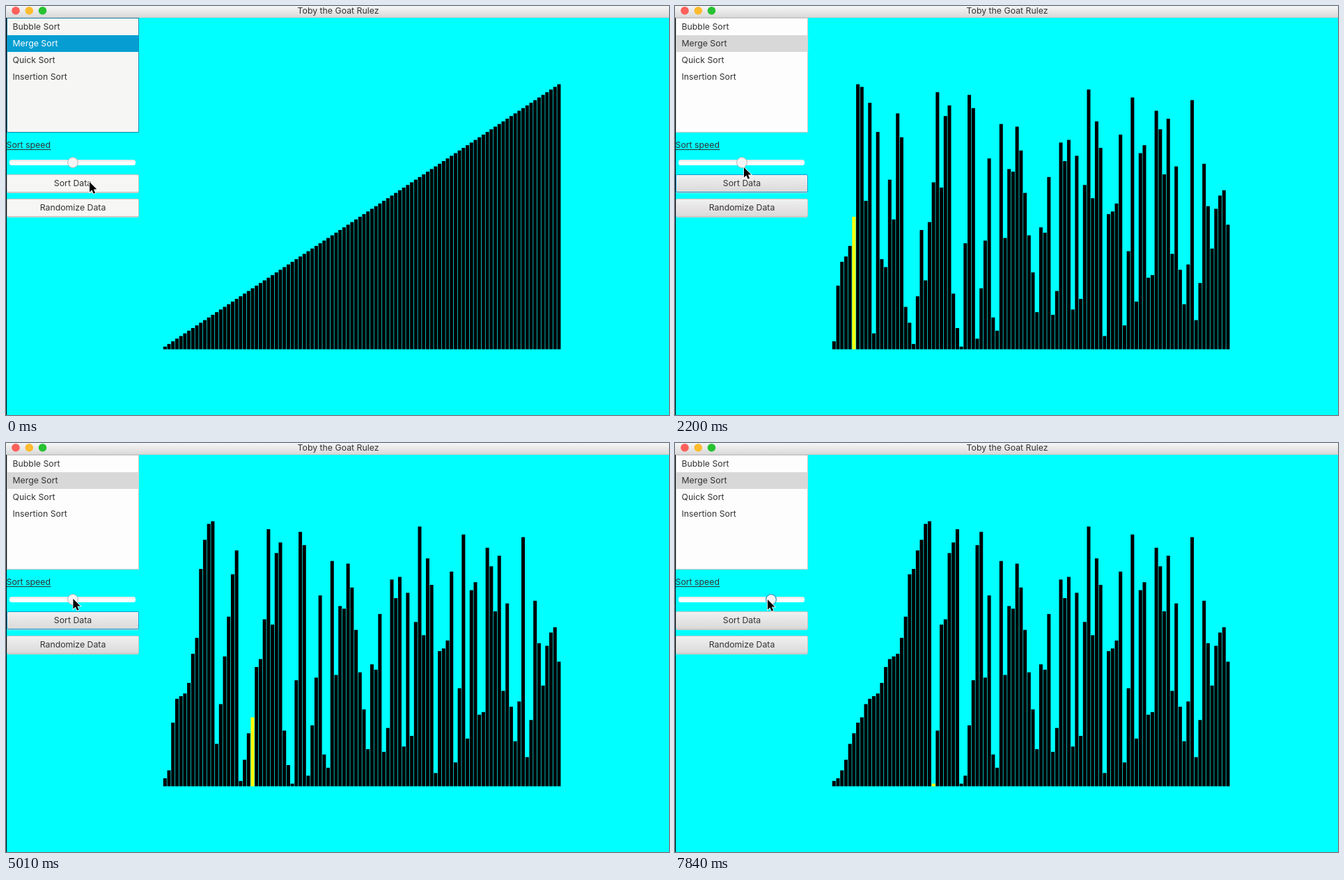
Write an HTML page that moves like this. It is 952 by 588 pixels and loops after 7.99 s.

```html
<!DOCTYPE html>
<html lang="en">
<head>
<meta charset="utf-8">
<title>Sort visualizer</title>
<style>
html, body { margin: 0; width: 100%; height: 100%; overflow: hidden; background: #0ff; }
svg { display: block; width: 952px; height: 588px; }
text { font: 12.3px Inter, Roboto, sans-serif; fill: #333; }
.mid { text-anchor: middle; }
</style>
</head>
<body>
<svg viewBox="0 0 952 588">
  <defs>
    <linearGradient id="chrome" x2="0" y2="1"><stop stop-color="#f6f6f6"/><stop offset="1" stop-color="#d8d8d8"/></linearGradient>
    <linearGradient id="button" x2="0" y2="1"><stop stop-color="#f1f1f1"/><stop offset="1" stop-color="#d9d9d9"/></linearGradient>
    <linearGradient id="track" x2="0" y2="1"><stop stop-color="#e6e6e6"/><stop offset=".5" stop-color="#fdfdfd"/><stop offset="1" stop-color="#fff"/></linearGradient>
  </defs>
  <rect width="952" height="588" fill="#0ff"/>
  <rect y="17" width="1" height="571" fill="#000"/>
  <rect width="952" height="17" fill="url(#chrome)"/>
  <rect y="16" width="952" height="1" fill="#c9c9c9"/>
  <circle cx="14" cy="6.7" r="5.8" fill="#fc605b"/>
  <circle cx="33.3" cy="6.7" r="5.8" fill="#fdbc2f"/>
  <circle cx="52.5" cy="6.7" r="5.8" fill="#28c231"/>
  <text class="mid" x="477" y="11">Toby the Goat Rulez</text>

  <g id="bars"></g>

  <rect id="list" x="1.5" y="17.5" width="189" height="164"/>
  <rect id="row" x="2" y="42" width="188.5" height="24"/>
  <g id="items"></g>

  <text x="0.5" y="204">Sort speed</text>
  <rect x="1" y="206" width="63.5" height="1" fill="#333"/>
  <rect x="5" y="221" width="181" height="8" rx="3" fill="url(#track)"/>
  <circle id="thumb" cy="225" r="7.4"/>

  <rect id="sort" x="1.5" y="242.5" width="189" height="25" rx="1.5"/>
  <rect x="2" y="268" width="188" height="1" fill="#d0d0d0"/>
  <text class="mid" x="96" y="259">Sort Data</text>
  <rect id="shuffle" x="1.5" y="277.5" width="189" height="25" rx="1.5"/>
  <rect x="2" y="303" width="188" height="1" fill="#d0d0d0"/>
  <text class="mid" x="96" y="294.3">Randomize Data</text>

  <path id="cursor" d="M0 0V14.6L3.4 11.4L5.7 16.8L8.2 15.8L5.9 10.5H10.4Z" stroke="#fff" stroke-width="1.6" paint-order="stroke"/>
</svg>
<script>
const DURATION = 7990, SHUFFLED = 600, SORT_CLICK = 1180, SLIDER_PRESS = 5310, SLIDER_RELEASE = 7090;
const ACCENT = '#039ed3';
const $ = id => document.getElementById(id);
const set = (el, attrs) => { for (const k in attrs) el.setAttribute(k, attrs[k]); return el; };
const add = (parent, tag, attrs) =>
  set(parent.appendChild(document.createElementNS('http://www.w3.org/2000/svg', tag)), attrs);

const shuffled = [
  39, 50, 24, 35, 100, 3, 33, 99, 56, 93, 6, 82, 34, 31, 64, 49, 89, 80, 16, 10,
  2, 20, 45, 26, 48, 63, 97, 61, 88, 92, 21, 8, 1, 40, 96, 91, 4, 23, 41, 72,
  12, 7, 85, 42, 68, 67, 84, 75, 59, 43, 29, 14, 46, 44, 65, 13, 22, 78, 71, 79,
  15, 73, 19, 62, 98, 57, 86, 76, 5, 51, 52, 55, 81, 9, 37, 95, 18, 74, 77, 27,
  28, 90, 83, 66, 87, 36, 69, 30, 17, 32, 94, 11, 25, 70, 54, 38, 53, 58, 60, 47
];
const sorted = shuffled.map((_, i) => i + 1);

// Every write of the merge sort, in order, as [index, value].
function mergeWrites(source) {
  const a = [...source], writes = [];
  (function sort(lo, hi) {
    if (lo >= hi) return;
    const mid = (lo + hi) >> 1;
    sort(lo, mid);
    sort(mid + 1, hi);
    const merged = a.slice(lo, hi + 1).sort((x, y) => x - y);
    merged.forEach((v, i) => { a[lo + i] = v; writes.push([lo + i, v]); });
  })(0, a.length - 1);
  return writes;
}
const writes = mergeWrites(shuffled);

// [time, ...values]
const progress = [[1220, 0], [1320, 2.5], [3100, 36.5], [4270, 59.5], [5750, 88.5],
  [5900, 91.9], [6640, 115.5], [7090, 131.3], [7840, 155.5]];
const pointer = [[0, 120, 253], [300, 112, 282], [600, 111, 286], [900, 108, 262], [1180, 106, 250],
  [1320, 102, 234], [3100, 96, 230], [4270, 95, 224], [5310, 97, 224], [5750, 115, 224],
  [5900, 125, 224], [6200, 136, 223], [6640, 136, 223], [7840, 133, 225]];
const knob = [[5310, 96], [5750, 112], [5900, 122.5], [6200, 137], [6640, 137], [7090, 138]];

function at(table, t) {
  const next = table.findIndex(p => p[0] > t);
  if (next < 0) return table[table.length - 1].slice(1);
  if (next === 0) return table[0].slice(1);
  const [a, b] = [table[next - 1], table[next]], f = (t - a[0]) / (b[0] - a[0]);
  return a.slice(1).map((v, i) => v + (b[i + 1] - v) * f);
}

// The screen refreshes in bursts of evenly spaced steps: [first, last, count].
const bursts = [[150, 1180, 8], [1320, 2350, 8], [2500, 3540, 8], [3690, 4710, 8],
  [4860, 5900, 8], [6050, 7090, 8], [7240, 7840, 5]];
function refreshTime(t) {
  const burst = bursts.filter(b => t >= b[0] - 2).pop();
  if (!burst) return 0;
  const [first, last, count] = burst, step = (last - first) / (count - 1);
  return first + step * Math.max(0, Math.min(count - 1, Math.floor((t - first + 8) / step)));
}

const bars = sorted.map((_, i) => add($('bars'), 'rect', { x: 225.8 + 5.714 * i, width: 5 }));
const items = ['Bubble Sort', 'Merge Sort', 'Quick Sort', 'Insertion Sort'].map((label, i) => {
  const item = add($('items'), 'text', { x: 9.5, y: 34.4 + 23.8 * i });
  item.textContent = label;
  return item;
});

function drawBars(t) {
  const values = t < SHUFFLED ? [...sorted] : [...shuffled];
  const done = Math.floor(at(progress, t)[0]);
  writes.slice(0, done).forEach(([i, v]) => { values[i] = v; });
  const active = done ? writes[done - 1][0] : -1;
  bars.forEach((bar, i) => set(bar, {
    y: 493.5 - 3.81 * values[i], height: 3.81 * values[i], fill: i === active ? '#ff0' : '#000'
  }));
}

function drawControls(t) {
  const focus = t < SHUFFLED ? 'list' : t < SORT_CLICK ? 'shuffle' : t < SLIDER_PRESS ? 'sort' : 'slider';
  const listFocus = focus === 'list';
  set($('list'), { fill: listFocus ? '#f6f6f5' : '#fdfdfd', stroke: listFocus ? '#1c87ab' : '#c8c8c8' });
  set($('row'), { fill: listFocus ? '#069ed2' : '#d8d8d8' });
  items[1].style.fill = listFocus ? '#fff' : '';
  for (const id of ['sort', 'shuffle']) set($(id), {
    fill: listFocus ? '#f6f6f5' : 'url(#button)', stroke: focus === id ? ACCENT : '#c4c4c4'
  });
  const dragging = t >= SLIDER_PRESS && t < SLIDER_RELEASE;
  set($('thumb'), {
    cx: at(knob, t)[0], fill: dragging ? '#dedede' : '#f5f5f5',
    stroke: focus === 'slider' ? '#3ba5cb' : '#b8b8b8', 'stroke-width': focus === 'slider' ? 1.4 : 1
  });
  set($('cursor'), { transform: `translate(${at(pointer, t)})` });
}

function frame(now) {
  const t = refreshTime(now % DURATION);
  drawBars(t);
  drawControls(t);
  requestAnimationFrame(frame);
}
frame(performance.now());
</script>
</body>
</html>
```
